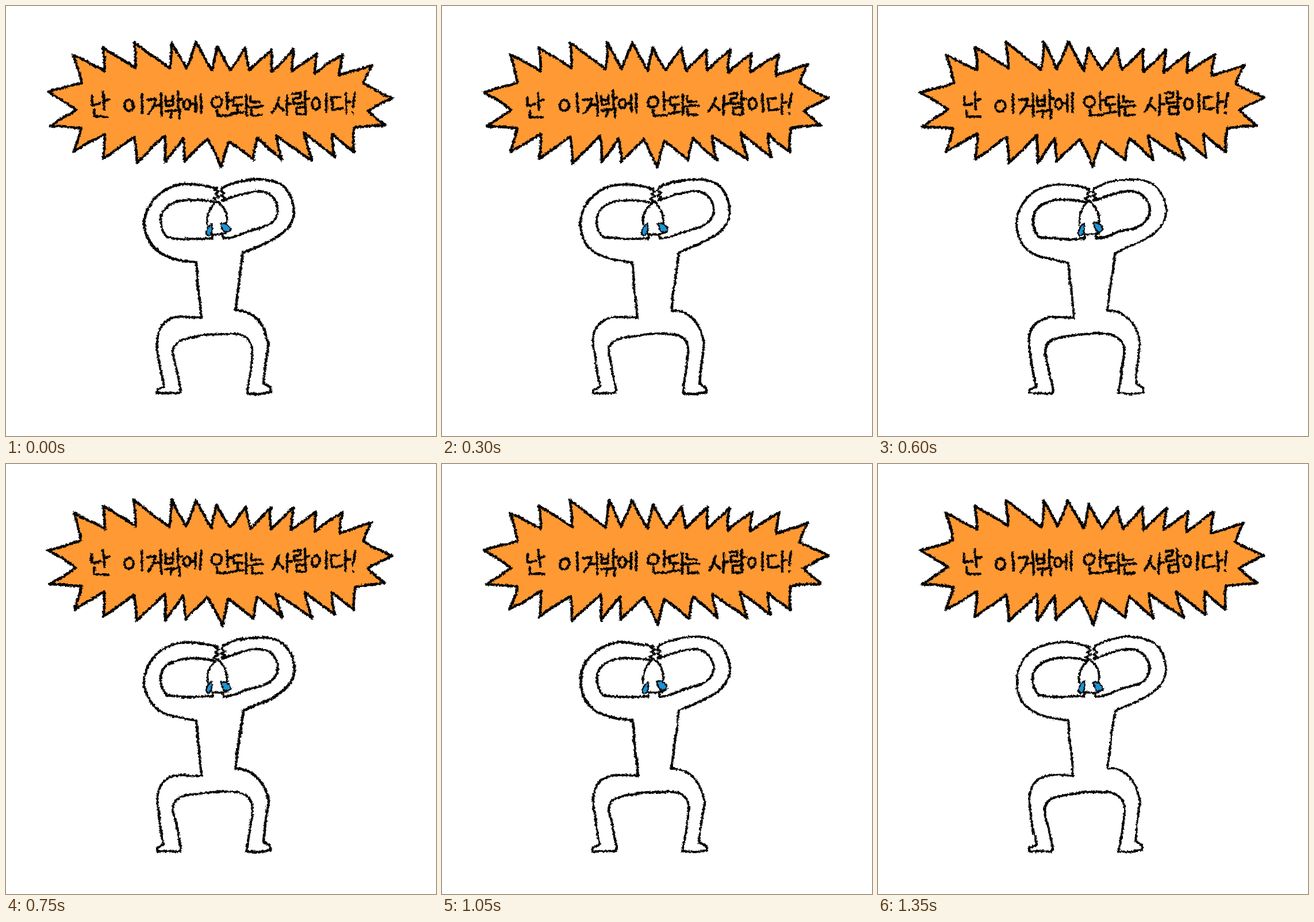
Animation of 748x748 px, one loop 1500 ms. Source, as an HTML page:

```html
<!DOCTYPE html>
<html lang="ko">
<head>
<meta charset="utf-8">
<title>난 이거밖에 안되는 사람이다!</title>
<style>
  html, body { margin: 0; width: 100%; height: 100%; overflow: hidden; background: #fff; }
  svg { display: block; width: 100vw; height: 100vh; }
  path { fill: none; stroke: #070504; stroke-width: 4.2; stroke-linecap: round; stroke-linejoin: round; }
  #burst { fill: #ff9933; stroke-width: 4.6; }
  #words path { stroke-width: 4.3; }
  #tears path { fill: #1c93d5; stroke-width: 2.6; }
  .fine path { stroke-width: 3.6; }
</style>
</head>
<body>
<svg viewBox="0 0 748 748">
  <defs>
    <filter id="rough" filterUnits="userSpaceOnUse" x="0" y="0" width="748" height="748" color-interpolation-filters="sRGB">
      <feTurbulence class="noise" type="fractalNoise" baseFrequency="0.025" numOctaves="1" result="slow"/>
      <feTurbulence class="noise" type="fractalNoise" baseFrequency="0.3" numOctaves="2" result="fast"/>
      <feDisplacementMap in="SourceGraphic" in2="slow" scale="4" xChannelSelector="R" yChannelSelector="G" result="bent"/>
      <feDisplacementMap in="bent" in2="fast" scale="5" xChannelSelector="R" yChannelSelector="G"/>
      <feGaussianBlur stdDeviation="0.4"/>
    </filter>
  </defs>

  <g filter="url(#rough)">
    <path id="burst"/>

    <g id="words" role="img" aria-label="난 이거밖에 안되는 사람이다!">
      <g>
        <path d="M150 157L150 172Q158 172 164 169M169 149L171 179M171 164L179 162M154 181L154 192L178 192"/>
      </g>
      <g>
        <path d="M213 164C203 166 202 182 212 183C224 182 224 164 213 164M235 153L236 185"/>
        <path d="M245 163L260 161Q257 176 247 187M258 173L268 172M269 152L270 191"/>
        <path d="M277 157L278 173L290 172L290 156M277 165L290 164M299 148L299 177M299 162L306 161M277 183L288 181L286 193M291 182L302 180L301 194"/>
        <path d="M314 162C306 164 306 178 314 179C322 178 322 163 314 162M321 170L328 169M329 155L329 183M338 152L338 185"/>
      </g>
      <g>
        <path d="M367 157C355 158 355 175 366 175C378 175 379 157 367 157M385 150L386 179M386 164L394 163M367 180L368 190L390 189"/>
        <path d="M410 158L396 159L396 172L411 171M403 172L403 184M393 187L413 184M418 154L418 190"/>
        <path d="M426 156L426 166L442 166M421 175L447 173M428 179L428 190L445 189"/>
      </g>
      <g>
        <path d="M475 160Q472 174 464 184M472 170L483 181M490 156L489 189M490 171L497 170"/>
        <path d="M500 153L513 151L513 159L502 161L502 169L516 168M521 149L521 174M521 162L528 161M506 176L522 175L522 188L507 188Z"/>
        <path d="M539 161C530 163 530 179 539 180C548 178 548 162 539 161M557 153L557 184"/>
        <path d="M580 159L566 160L567 180Q576 181 585 178M591 152L591 187M591 168L599 167"/>
        <path d="M607 152L604 176M604 186L604.5 187"/>
      </g>
    </g>

    <g id="body">
      <path d="M367 318C320 304 282 309 259 334C239 355 235 386 250 412C262 434 291 441 331 446L335 490L340 542"/>
      <path d="M340 542L310 541C276 541 262 558 263 592L268 628L275 662L263 668L263 674L302 673L304 667L296 630L290 603C290 583 308 577 332 574C360 570 385 568 404 571C425 575 430 590 428 606L424 638L418 674"/>
      <path d="M377 316C402 302 443 296 471 306C490 313 500 337 501 358C500 396 455 411 412 429L406 475L399 530C431 528 451 555 457 587L451 625L448 657L460 664L461 672L440 675L418 674"/>
      <path d="M362 341C330 334 302 336 284 347C264 360 265 386 280 402C302 406 330 406 358 404"/>
      <path d="M378 338C400 330 420 322 440 322C465 323 476 345 472 362C466 384 442 387 421 392C405 398 395 404 379 405"/>
    </g>

    <g class="fine">
      <path d="M366 340C353 353 348 366 350 380M368 339C380 348 387 361 384 380M359 397Q371 399 384 396M360 397L359 405M377 397L379 405"/>
      <path d="M363 319L370 323L364 327L370 331L361 335L368 340M377 316L374 322L380 326L374 330L381 333L375 338"/>
    </g>

    <g id="tears">
      <path d="M358 378C349 385 345 396 351 399C358 400 360 389 358 378Z"/>
      <path d="M374 379C382 376 391 383 392 390C388 396 380 395 378 390Z"/>
    </g>
  </g>
</svg>
<script>
  const STEP = 150, STEPS = 10;
  const all = sel => [...document.querySelectorAll(sel)];

  // Spike tips and valleys, alternating clockwise from the left tip.
  const rim = [
    73,150, 131,133, 118,85, 172,113, 169,73, 226,108, 222,63, 284,110,
    289,63, 312,108, 330,62, 358,112, 366,71, 390,111, 417,73, 425,112,
    461,75, 461,114, 501,76, 497,114, 541,82, 536,117, 585,84, 581,121,
    636,102, 622,135, 672,160, 629,182, 660,207, 607,212, 605,254, 567,222,
    572,262, 519,222, 532,268, 470,226, 480,268, 437,230, 430,268, 387,235,
    375,281, 351,232, 311,270, 308,230, 277,272, 276,226, 227,273, 223,228,
    169,265, 172,222, 118,253, 131,213, 77,209, 121,180
  ];

  function rand(step, i) {
    const v = Math.sin(step * 127.1 + i * 311.7 + 4.3) * 43758.5453;
    return (v - Math.floor(v)) * 2 - 1;
  }

  // Edges sag slightly toward the middle of the bubble.
  function burstPath(step) {
    const n = rim.length / 2;
    const at = k => {
      const i = k % n;
      return [rim[2 * i] + rand(step, i) * 0.8, rim[2 * i + 1] + rand(step, i + 60) * 0.8];
    };
    let d = "M" + at(0);
    for (let k = 0; k < n; k++) {
      const [ax, ay] = at(k), [bx, by] = at(k + 1);
      const mx = (ax + bx) / 2, my = (ay + by) / 2;
      const sag = Math.hypot(bx - ax, by - ay) * 0.06;
      const dx = 372 - mx, dy = 170 - my, len = Math.hypot(dx, dy);
      d += `Q${mx + dx / len * sag} ${my + dy / len * sag} ${bx} ${by}`;
    }
    return d + "Z";
  }

  const burst = document.getElementById("burst");
  const noise = all(".noise");
  const words = all("#words > g"), letters = all("#words path");
  const limbs = all("#body path"), tears = all("#tears path");

  const nudge = (list, step, salt, size) => list.forEach((el, i) =>
    el.setAttribute("transform",
      `translate(${rand(step, salt + i) * size} ${rand(step, salt + i + 30) * size})`));

  function draw(step) {
    noise.forEach((el, i) => el.setAttribute("seed", step * 7 + i * 3 + 2));
    burst.setAttribute("d", burstPath(step));
    nudge(words, step, 150, 0.9);
    nudge(letters, step, 220, 0.6);
    nudge(tears, step, 300, 0.9);
    limbs.forEach((el, i) => el.style.strokeWidth = 4.2 + rand(step, 400 + i) * 0.5);
  }

  let shown = -1;
  function tick() {
    const step = Math.floor(performance.now() / STEP) % STEPS;
    if (step !== shown) draw(shown = step);
    requestAnimationFrame(tick);
  }
  tick();
</script>
</body>
</html>
```
